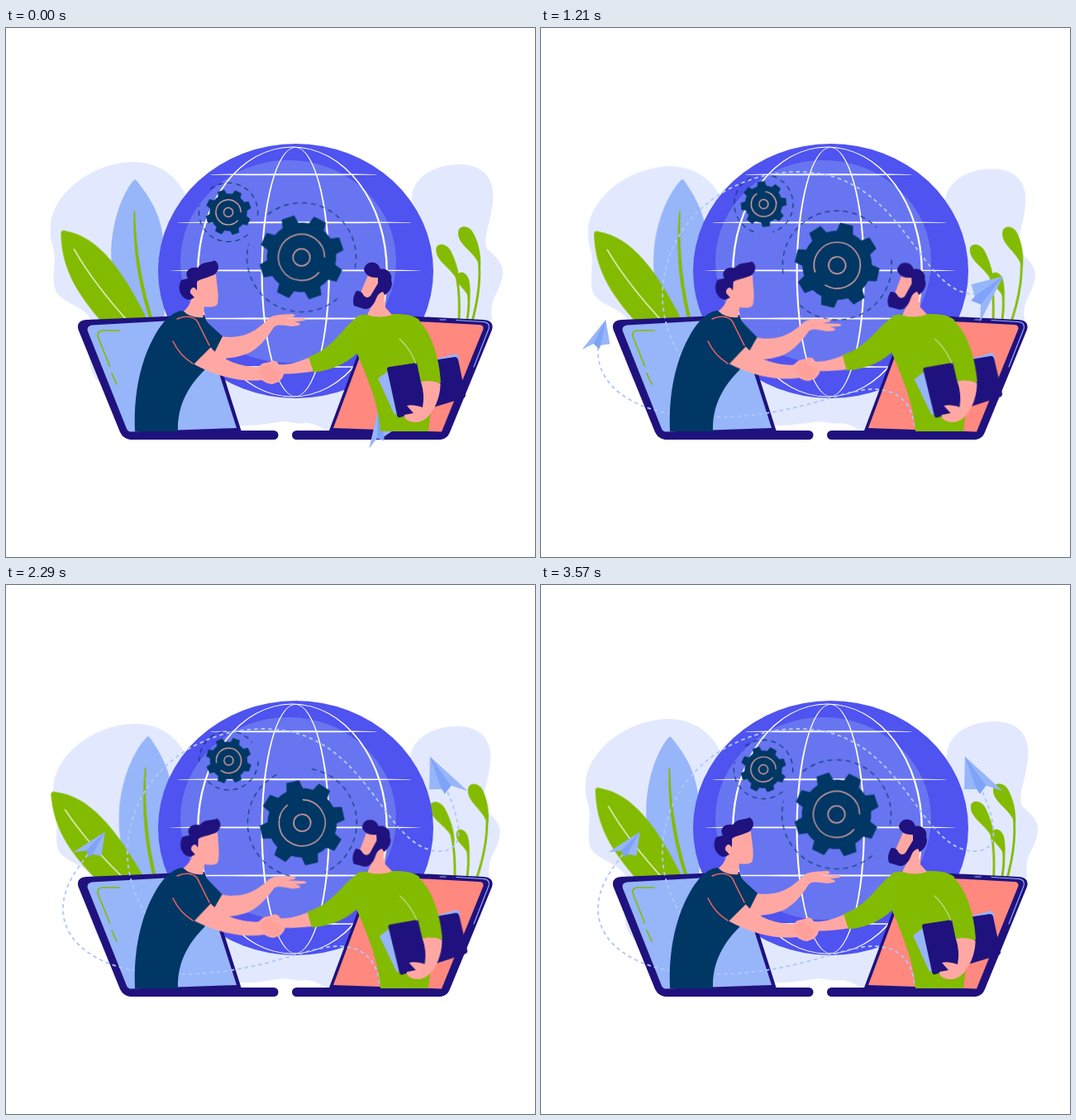
Write an HTML page that moves like this. It is 640 by 640 pixels and loops after 3.64 s.

```html
<!DOCTYPE html>
<html lang="en">
<head>
<meta charset="utf-8">
<title>Partnership</title>
<style>
  html, body { margin: 0; width: 100%; height: 100%; overflow: hidden; background: #fff; }
  svg { display: block; width: 100vw; height: 100vh; }

  :root {
    --loop: 3640ms;
    --soft: cubic-bezier(.37, 0, .63, 1);
    --glide: cubic-bezier(.3, .1, .1, 1);
  }
  .navy { fill: #003765; }
  .ink { fill: #1f127e; }
  .sky { fill: #97b5f9; }
  .leaf { fill: #83bb00; }
  .skin { fill: #ffa8a3; }
  .line { fill: none; stroke-linecap: round; stroke-linejoin: round; }
  .stem { stroke: #83bb00; stroke-width: 2.8; }

  /* Each swaying part rests at its start pose and leans to --m halfway. */
  .sway { animation: sway var(--loop) var(--soft) infinite; }
  .wave { animation: wave var(--loop) var(--soft) -3140ms infinite; }
  .spin { animation: spin var(--loop) linear infinite; }
  .back { animation-name: spin-back; }
  .fly { animation: fly var(--loop) var(--glide) infinite; offset-rotate: auto; transform-origin: 0 0; }
  .draw { animation: draw var(--loop) var(--glide) infinite; stroke-dasharray: 1 1; }

  .fly.a { offset-path: path("M452 482C448 450 428 437 402 437C362 437 310 471 205 471C120 471 69 437 69 392C69 360 92 336 109 313"); }
  .fly.b { offset-path: path("M190 425C168 403 147 365 147 325C147 235 225 174 312 174C440 174 455 322 525 322C566 322 542 264 524 229"); }

  @keyframes sway { 0%, 98.08%, 100% { transform: none; } 49.04% { transform: var(--m); } }
  @keyframes wave { 0%, 100% { transform: rotate(var(--hi)); } 50% { transform: rotate(var(--lo)); } }
  @keyframes spin { 0% { transform: rotate(0deg); } 98.08%, 100% { transform: rotate(360deg); } }
  @keyframes spin-back { 0% { transform: rotate(0deg); } 98.08%, 100% { transform: rotate(-360deg); } }
  @keyframes fly { 0% { offset-distance: 0%; } 63%, 100% { offset-distance: 100%; } }
  @keyframes draw { 0% { stroke-dashoffset: 1; } 63%, 100% { stroke-dashoffset: 0; } }
</style>
</head>
<body>
<svg viewBox="0 0 640 640">
  <defs>
    <path id="pathA" d="M452 482C448 450 428 437 402 437C362 437 310 471 205 471C120 471 69 437 69 392C69 360 92 336 109 313"/>
    <path id="pathB" d="M190 425C168 403 147 365 147 325C147 235 225 174 312 174C440 174 455 322 525 322C566 322 542 264 524 229"/>
    <mask id="showA" maskUnits="userSpaceOnUse" x="0" y="0" width="640" height="640">
      <path class="draw" pathLength="1" fill="none" stroke="#fff" stroke-width="8" d="M452 482C448 450 428 437 402 437C362 437 310 471 205 471C120 471 69 437 69 392C69 360 92 336 109 313"/>
    </mask>
    <mask id="showB" maskUnits="userSpaceOnUse" x="0" y="0" width="640" height="640">
      <path class="draw" pathLength="1" fill="none" stroke="#fff" stroke-width="8" d="M190 425C168 403 147 365 147 325C147 235 225 174 312 174C440 174 455 322 525 322C566 322 542 264 524 229"/>
    </mask>
    <g id="plane">
      <path class="sky" d="M18 0L-25-16L-14-5L-13 4L-8 14Z"/>
      <path fill="#7fa3f8" d="M18 0L-14-5L-18 3.5L-12 4Z"/>
    </g>
    <path id="cog" d="M-8-51H8L11-36V36L8 51H-8L-11 36V-36Z"/>
    <g id="gear">
      <g class="navy" transform="rotate(26)">
        <circle r="42"/>
        <use href="#cog"/>
        <use href="#cog" transform="rotate(45)"/>
        <use href="#cog" transform="rotate(90)"/>
        <use href="#cog" transform="rotate(135)"/>
      </g>
      <g fill="none" stroke="#ffb3ac" stroke-width="1.2">
        <circle r="10.3" vector-effect="non-scaling-stroke"/>
        <path vector-effect="non-scaling-stroke" d="M21.4 18A28 28 0 1 1 28 0"/>
      </g>
      <path fill="none" stroke="#003765" stroke-width="1.1" stroke-dasharray="6 5" vector-effect="non-scaling-stroke" d="M43.3 49.8A66 66 0 0 1-64-16M-40.6-52A66 66 0 0 1 64.8 12.6"/>
    </g>
  </defs>

  <!-- Backdrop -->
  <path class="sway" style="--m:scale(.985,.978);transform-origin:325px 480px" fill="#e2e9fe" d="M54 240C56 200 105 162 155 162C195 163 215 190 222 215L330 300L494 230C490 220 491 212 491 205C492 180 520 165 548 165C580 165 592 185 589 210C587 235 576 255 582 267C590 275 602 283 601 297C599 320 584 325 588 352L540 440L392 488C380 484 374 478 362 478C352 480 345 476 335 476C318 478 300 482 280 481L160 450C130 440 115 435 106 420C96 400 104 372 104 355C95 335 70 335 60 318C54 300 62 280 57 265C54 255 53 250 54 240Z"/>

  <!-- Left plants -->
  <g class="sway" style="--m:rotate(5deg);transform-origin:170px 410px">
    <path class="sky" d="M153 186Q156 181 159 186C170 200 182 217 187 238C194 265 194 320 190 370H158C140 340 130 318 128 290C124 250 136 208 153 186Z"/>
    <path class="leaf" d="M154.500 222Q155.500 220 156.200 222C157 270 166 318 181 362H177C161 318 153 270 154.500 222Z"/>
  </g>
  <g class="wave" style="--hi:1.2deg;--lo:-3.3deg;transform-origin:142px 437px">
    <path class="leaf" d="M65 248Q66 244 71 246C110 253 140 290 176 364H122C88 325 66 296 65 248Z"/>
    <path class="line" stroke="#fff" stroke-width="1.3" d="M81 268C98 297 121 327 150 358"/>
  </g>

  <!-- Right plants -->
  <g class="sway" style="--m:rotate(4.4deg);transform-origin:555px 437px">
    <path class="leaf" d="M547 248C547 238 560 237 566 249C573 263 575 277 574 290C567 269 547 264 547 248Z"/>
    <path class="line stem" d="M562 362C573 325 576 295 570 266"/>
  </g>
  <g class="wave" style="--hi:.85deg;--lo:-1.1deg;transform-origin:547px 530px">
    <path class="leaf" d="M518 269C517 260 530 259 536 270C543 284 547 298 547 312C540 291 518 284 518 269Z"/>
    <path class="line stem" d="M546 362C548 327 546 303 538 284"/>
  </g>
  <g class="sway" style="--m:rotate(-1.8deg);transform-origin:557px 352px">
    <path class="leaf" d="M546 302C546 293 556 293 560 304C562 313 562 322 561 330C558 316 546 313 546 302Z"/>
    <path class="line stem" d="M557 358C561 337 561 322 557 311"/>
  </g>

  <!-- Globe -->
  <ellipse cx="350.5" cy="294" rx="166.5" ry="154" fill="#4f53ef"/>
  <ellipse cx="341.5" cy="282.5" rx="130.5" ry="122.5" fill="#6875f0"/>
  <g fill="#fff">
    <path fill-rule="evenodd" d="M231 295A115.5 151.5 0 0 1 462 295A115.5 151.5 0 0 1 231 295ZM233.4 295A113.1 150.6 0 0 0 459.6 295A113.1 150.6 0 0 0 233.4 295Z"/>
    <path fill-rule="evenodd" d="M308.500 295A41.700 151 0 0 1 391.900 295A41.700 151 0 0 1 308.500 295ZM310.700 295A39.500 150.300 0 0 0 389.700 295A39.500 150.300 0 0 0 310.700 295Z"/>
    <ellipse cx="348" cy="177.3" rx="101" ry="1"/>
    <ellipse cx="349" cy="235.3" rx="142" ry="1"/>
    <ellipse cx="350" cy="293.4" rx="153" ry="1"/>
    <ellipse cx="350" cy="351.5" rx="143" ry="1"/>
    <ellipse cx="349" cy="410" rx="101" ry="1"/>
  </g>

  <!-- Gears -->
  <g class="sway" style="--m:translate(.5px,-13px)">
    <g transform="translate(269 223) scale(.54)"><g class="spin back"><use href="#gear"/></g></g>
  </g>
  <g class="sway" style="--m:translate(1px,12.5px)">
    <g transform="translate(357.5 277.5)"><g class="spin"><use href="#gear"/></g></g>
  </g>

  <!-- Laptops -->
  <path class="ink" d="M97 353L240 347L284.5 487H324A5.5 5.5 0 0 1 324 498H150Q142 497 138 489L87.5 365Q84.5 354 97 353Z"/>
  <path class="sky" d="M104 359.5L237 352L279 484L150 488.5Q147 488 146 485L99 367Q97 361 104 359.5Z"/>
  <path class="line" stroke="#83bb00" stroke-width="1.7" d="M137 366H116Q110 367 111 373L125.5 409M128 418L134 431"/>
  <path class="ink" d="M578 353L436 346L428 388L391 487H351.5A5.5 5.5 0 0 0 351.5 498H526Q534 497 537 489L588 365Q591 354 578 353Z"/>
  <path fill="#ff887f" d="M572 359L440 352L431 390L396 484L527 488.5L577.5 364Q578 359 572 359Z"/>
  <path class="line" stroke="#97b5f9" stroke-width="1.1" d="M525 353H532M545 353.5L577 355.5Q586 356 584 364L566 410"/>

  <!-- Paper planes -->
  <g fill="none" stroke="#b0c7fb" stroke-width="1.9" stroke-dasharray="4.5 4">
    <g mask="url(#showA)"><use href="#pathA"/></g>
    <g mask="url(#showB)"><use href="#pathB"/></g>
  </g>
  <g class="fly a"><use href="#plane"/></g>
  <g class="fly b"><use href="#plane" transform="scale(1.35 -1.35)"/></g>

  <!-- Left man -->
  <g class="sway" style="--m:rotate(4.2deg);transform-origin:240px 365px">
    <path class="skin" d="M260 373C284 377 302 368 316 353C322 346 334 347 346 346Q352 347 348 349.500L340 351.500L360 351Q365 352 361 354L349 355.500L354 356.500Q358 359 353 360L346 361C336 360 329 358 324 362C314 378 304 388 294 393C280 399 262 402 246 398Z"/>
    <path class="navy" d="M238 351L262 373L249 399L232 390Z"/>
  </g>
  <g class="sway" style="--m:rotate(3.2deg);transform-origin:225px 345px">
    <path class="skin" d="M226 304L254 298C255 312 258 322 256 333C255 338 247 338 240 337L238 353Q224 358 213 344Q222 338 225 326Z"/>
    <path class="ink" d="M222 329C212 328 206 316 212 305L220 303C215 295 222 288 232 290C239 281 247 285 252 281C260 285 258 297 248 300C241 303 234 304 231 307V319L228 314C222 313 222 321 228 326Z"/>
    <circle class="skin" cx="227" cy="319" r="4.2"/>
  </g>
  <path class="navy" d="M156 488C154 440 164 400 180 372C190 354 203 342 214 342Q224 352 240 350L254 372L248 395L240 414C222 432 207 455 208 488Z"/>
  <g class="sway" style="--m:rotate(-2deg);transform-origin:215px 385px">
    <path class="skin" d="M246 384C258 401 284 411 308 410L320 424C296 430 262 426 226 406Z"/>
    <path class="navy" d="M208 356Q228 346 236 360L249 385L227 407L200 378Z"/>
  </g>
  <path class="line" stroke="#ff6a62" stroke-width="1.4" d="M207 352C218 347 230 348 234 360L246 384M202 379Q210 396 226 406"/>

  <!-- Right man -->
  <path class="leaf" d="M425 348L440 346H468C484 346 492 347 500 353L518 430L511 488H453C451 455 438 425 424 392Z"/>
  <g class="sway" style="--m:rotate(-3deg);transform-origin:452px 345px">
    <path class="skin" d="M438 299L455 304L460 320L459 338L467 347Q452 352 437 347L442 337L427 325Z"/>
    <path class="ink" d="M433 293C434 281 450 280 453 292C460 290 468 296 466 305C469 311 464 320 458 323L456 319Q450 321 448 327C445 335 440 341 434 340L421 336Q418 327 424 318Q430 317 433 324Q437 328 441 324L450 309L450 302Q437 303 433 293Z"/>
    <path class="line" stroke="#fff" stroke-width="1.2" d="M459 323L458 331"/>
  </g>
  <g class="sway" style="--m:rotate(2.8deg);transform-origin:430px 360px">
    <path class="skin" d="M368 398C354 404 344 408 329 407L326 418C342 419 356 418 374 415Z"/>
    <path class="leaf" d="M430 347C409 357 400 386 366 398L372 416.5C398 414 417 403 431 387L444 360Z"/>
  </g>
  <g class="sway" style="--m:translate(2px,-5px)">
    <path class="skin" d="M302 413L310 406L319 404Q326 400 330 407L336 415Q337 422 330 428L322 431Q313 431 303 420Z"/>
    <path fill="#ffa09a" d="M309 411L318 406L322 412L333 417L328 427L319 429Q310 424 306 417Z"/>
  </g>

  <!-- Folder arm -->
  <g class="sway" style="--m:rotate(-1.7deg);transform-origin:490px 350px">
    <path class="sky" d="M450 424L461 416L545 394L549 401L485 462L470 468Z"/>
    <path class="ink" d="M461 413Q461 410 464 410L543 398Q546 398 547 401L556 444Q556 447 553 448L477 471Q474 472 473 468Z"/>
    <path class="leaf" d="M484 348C506 347 524 388 526 429Q512 434 502 429L497 405L488 404L474 372Z"/>
    <path class="skin" d="M502 428Q514 425 525.5 430C526 450 513 477 496 477C486 477 481 472 482 468L493 466L485 457Q492 455 504 459Q507 444 502 428Z"/>
    <path class="line" stroke="#c5df91" stroke-width="1.1" d="M476 376Q489 388 496 406"/>
  </g>
</svg>
</body>
</html>
```
